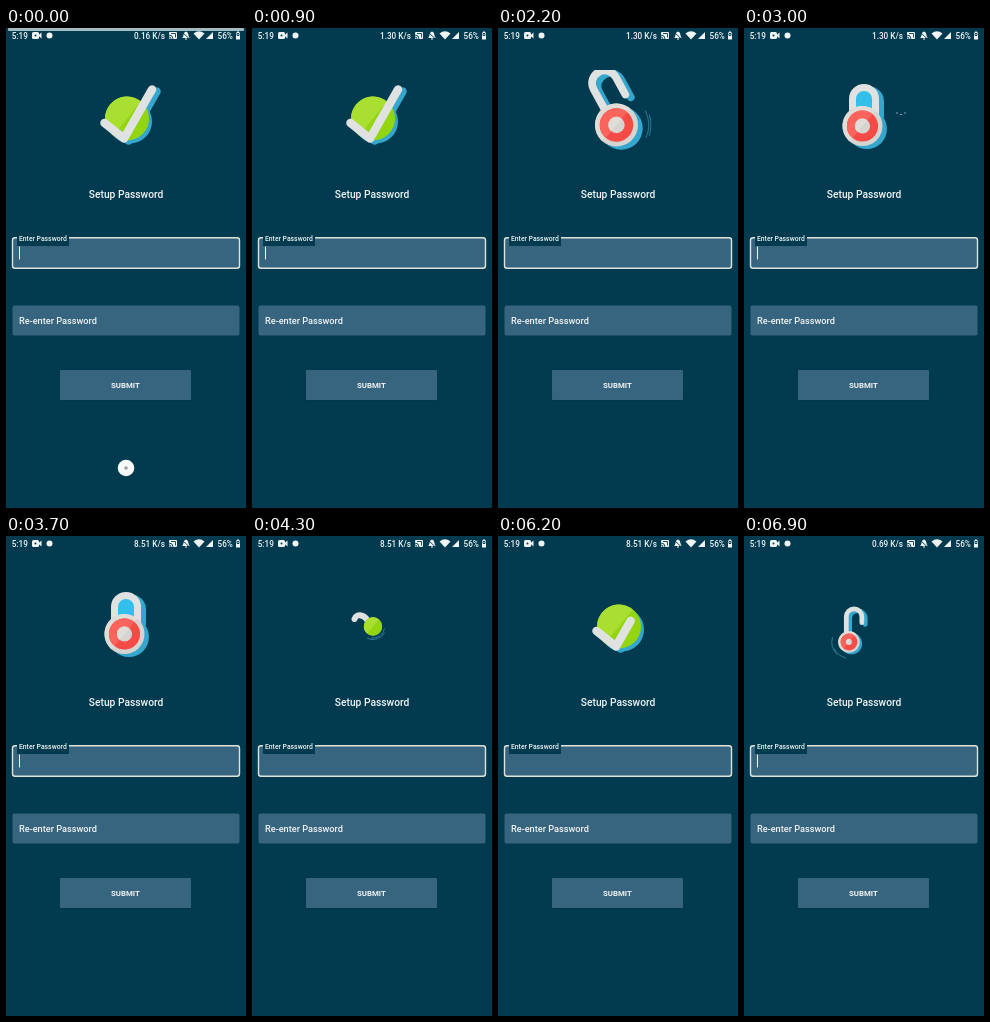
An HTML page with a canvas that plays this animation: 240 px wide and 480 px high, repeating every 7 s.

```html
<!DOCTYPE html>
<html lang="en">
<head>
<meta charset="utf-8">
<title>Setup Password</title>
<style>
  html, body { margin: 0; width: 240px; height: 480px; overflow: hidden; background: #023b50; }
  svg, canvas { position: absolute; left: 0; top: 0; width: 240px; height: 480px; }
  text { font-family: Roboto, sans-serif; font-weight: 500; fill: #f1f4f4; }
  .status { font-size: 8.2px; }
  .panel { fill: #37647f; }
  .icon { fill: #f1f4f4; }
  .cut { fill: none; stroke: #023b50; stroke-width: .9; }
</style>
</head>
<body>
<svg viewBox="0 0 240 480">
  <g class="status">
    <text x="5.7" y="10.5">5:19</text>
    <text id="speed" x="128" y="10.5">0.16 K/s</text>
    <text x="211.5" y="10.5">56%</text>
  </g>
  <g class="icon">
    <rect x="26" y="4" width="7" height="7" rx="1.5"/>
    <path d="M32 7.5L35.500 4.500V10.500Z"/>
    <circle cx="43.5" cy="7.5" r="3"/>
    <rect x="163" y="4" width="8" height="7" rx="1"/>
    <path d="M176 10C178 9 177 4 180 3.500C183 4 182 9 184 10ZM179 10.500h2v1h-2Z"/>
    <path d="M187.500 5.500Q193 1 198.500 5.500L193 11.500Z"/>
    <path d="M200 11L207 4V11Z"/>
    <path d="M230 4.500h1v-1h2v1h1v7h-4Z"/>
  </g>
  <path class="cut" d="M163 7Q167 7 167 11M163 9Q165 9 165 11M165 5.500H169.500V9.500M176 4L184 11.500M231 5.500h2v2h-2Z"/>
  <circle cx="29.500" cy="7.500" r="1" fill="#023b50"/>

  <text x="82.800" y="170" font-size="10.25">Setup Password</text>

  <rect x="6.500" y="209.700" width="227" height="30.500" rx="2.500" class="panel" stroke="#e0e3da" stroke-width="1.400"/>
  <rect x="11" y="205" width="52" height="13" fill="#023b50"/>
  <text x="13" y="212.700" font-size="6.8">Enter Password</text>
  <rect id="caret" x="13" y="218.500" width="1" height="13" fill="#f1f4f4"/>

  <rect x="6.500" y="277.500" width="227" height="30" rx="2" class="panel"/>
  <text x="13" y="295.600" font-size="9.2">Re-enter Password</text>

  <rect x="54" y="343" width="131" height="30" rx="1" fill="#02344a"/>
  <rect x="54" y="342" width="131" height="30" rx="1" class="panel"/>
  <text x="105" y="359.700" font-size="7.8" style="font-weight:700">SUBMIT</text>

  <g id="overlay">
    <rect x="2" width="236" height="3" rx="1" fill="#a3bcc2"/>
    <circle cx="120" cy="440" r="8.300" fill="#f7f8f8"/>
    <circle cx="120" cy="440" r="1.800" fill="#9aa1a4"/>
  </g>
</svg>
<canvas id="logo"></canvas>
<script>
const LOOP = 7000, CYCLE = 4900, STEP = 100;
const BLUE = '#35a6cd', GREY = '#dfe2e1';
const RED = ['#fb635d', '#f54b46'], GREEN = ['#a9df31', '#93d610'], STEEL = ['#e0ddd8', '#d5d4d0'];
const SPEEDS = ['0.16', '1.30', '8.51', '0.69'];
const TICK = new Path2D('M98.5 95L118 110.500L146 61.500');
const HOOK = new Path2D('M117 88C114 78 104 77 102.500 83');

const $ = id => document.getElementById(id);
const canvas = $('logo'), g = canvas.getContext('2d');
const dpr = window.devicePixelRatio || 1;
canvas.width = 240 * dpr;
canvas.height = 480 * dpr;

const mix = (a, b, u) => a + (b - a) * u;

// Eased 0 to 1 between two times
function ramp(t, from, to) {
  const u = Math.min(1, Math.max(0, (t - from) / (to - from)));
  return u * u * (3 - 2 * u);
}

function disc(x, y, r, color, from = 0, to = Math.PI * 2) {
  g.fillStyle = color;
  g.beginPath();
  g.arc(x, y, r, from, to);
  g.fill();
}

function twoTone(x, y, r, [light, dark]) {
  disc(x, y, r, dark);
  disc(x, y, r, light, Math.PI * .72, Math.PI * 1.72);
}

function stroke(path, color, width) {
  g.strokeStyle = color;
  g.lineWidth = width;
  g.stroke(path);
}

function swoosh(x, y, r, from, to) {
  const path = new Path2D();
  path.arc(x, y, r, from, to);
  stroke(path, '#398ba6', .8);
}

function shackle(x, y, tilt, scale, left, right, color, fill) {
  const path = new Path2D();
  path.moveTo(0, 0);
  path.lineTo(0, -left);
  path.arc(11.5, -left, 11.5, Math.PI, 0);
  path.lineTo(23, right - left);
  g.save();
  g.translate(x, y);
  g.rotate(tilt);
  g.scale(scale, scale);
  if (fill) {
    g.fillStyle = fill;
    g.fill(path);
  }
  stroke(path, color, 7);
  g.restore();
}

function drawSparks(p) {
  g.fillStyle = '#7fa3ad';
  for (let i = 0; i < 3; i++) {
    g.fillRect(152 + i * 4 + (p - 3000) / 60, 84.5 + i % 2 * 1.5, 2, 1);
  }
}

function drawLock(p) {
  const grow = ramp(p, 1800, 2200), shut = ramp(p, 2200, 2600);
  const r = 21.5 * grow - 1.5 * shut;
  const x = mix(91.5, 118.5, grow), y = mix(115, 97, grow) + shut;
  const scale = .25 + .85 * grow - .1 * shut;
  const tilt = (.5 - grow) * (1 - shut);
  const left = 32 - 9 * grow - 8.5 * shut, right = 18 * grow - 3.5 * shut;
  const fx = x - r * grow / 2, fy = y - r * .63;
  const size = 1 - .55 * ramp(p, 3950, 4200);

  g.save();
  g.translate(120, 92);
  g.scale(size, size);
  g.translate(-120, -92);
  shackle(fx + 5 * scale, fy + 2.5 * scale, tilt, scale, left, right, BLUE);
  disc(x + r * .22, y + r * .15, r, BLUE);
  shackle(fx, fy, tilt, scale, left, right, GREY, shut === 1 && '#33bfeb');
  twoTone(x, y, r, STEEL);
  twoTone(x, y, r * .78, RED);
  twoTone(x, y, r * .38 * Math.sqrt(grow), STEEL);
  if (shut === 0) {
    swoosh(x, y, r * 1.5, mix(4, -.45, grow), mix(5, .4, grow));
    swoosh(x, y, r * 1.6, mix(5, -.3, grow), mix(6.5, .3, grow));
  }
  g.restore();
  if (p >= 2800 && p < 3200) drawSparks(p);
}

function drawTick(p) {
  const x = 121, y = 90.5;
  const shown = 1 - ramp(p, 1325, 1825) + ramp(p, 4100, 4550);
  const r = 22 * shown + 2 * Math.sin(Math.PI * ramp(p, 4450, 4750));
  const grown = 1 - ramp(p, 1200, 1450) + ramp(p, 4450, 4750);
  const hooked = p > 4150 && p < 4500;
  const shade = Math.max(0, r - 10) / 4;

  g.setLineDash([84 * grown, 200]);
  if (grown > 0) {
    g.translate(4.5, 2);
    stroke(TICK, BLUE, 8.5);
    g.translate(-4.5, -2);
  }
  disc(x + shade, y + shade, r, BLUE);
  if (hooked) {
    g.setLineDash([]);
    stroke(HOOK, GREY, 6 * Math.sin(Math.PI * ramp(p, 4100, 4500)));
    swoosh(x, y, r + 2.5, .2, 1.7);
    swoosh(x, y, r + 4, .5, 2);
    g.setLineDash([84 * grown, 200]);
  }
  twoTone(x, y, r, GREEN);
  if (grown > 0) stroke(TICK, GREY, 8.5);
}

function draw() {
  const now = performance.now() + 15;
  const t = Math.floor(now / STEP) * STEP % LOOP, p = t % CYCLE;
  $('speed').textContent = SPEEDS[Math.floor((t + 2600) / 3000)] + ' K/s';
  $('caret').style.opacity = (t + 300) % 1000 < 500 ? 1 : 0;
  $('overlay').style.opacity = Math.max(0, 1 - t / 300);

  g.setTransform(dpr, 0, 0, dpr, 0, 0);
  g.clearRect(0, 0, 240, 480);
  g.save();
  g.beginPath();
  g.rect(60, 42, 120, 100);
  g.clip();
  g.lineCap = g.lineJoin = 'round';
  if (p > 1800 && p < 4200) drawLock(p);
  drawTick(p);
  g.restore();
  requestAnimationFrame(draw);
}
draw();
</script>
</body>
</html>
```
